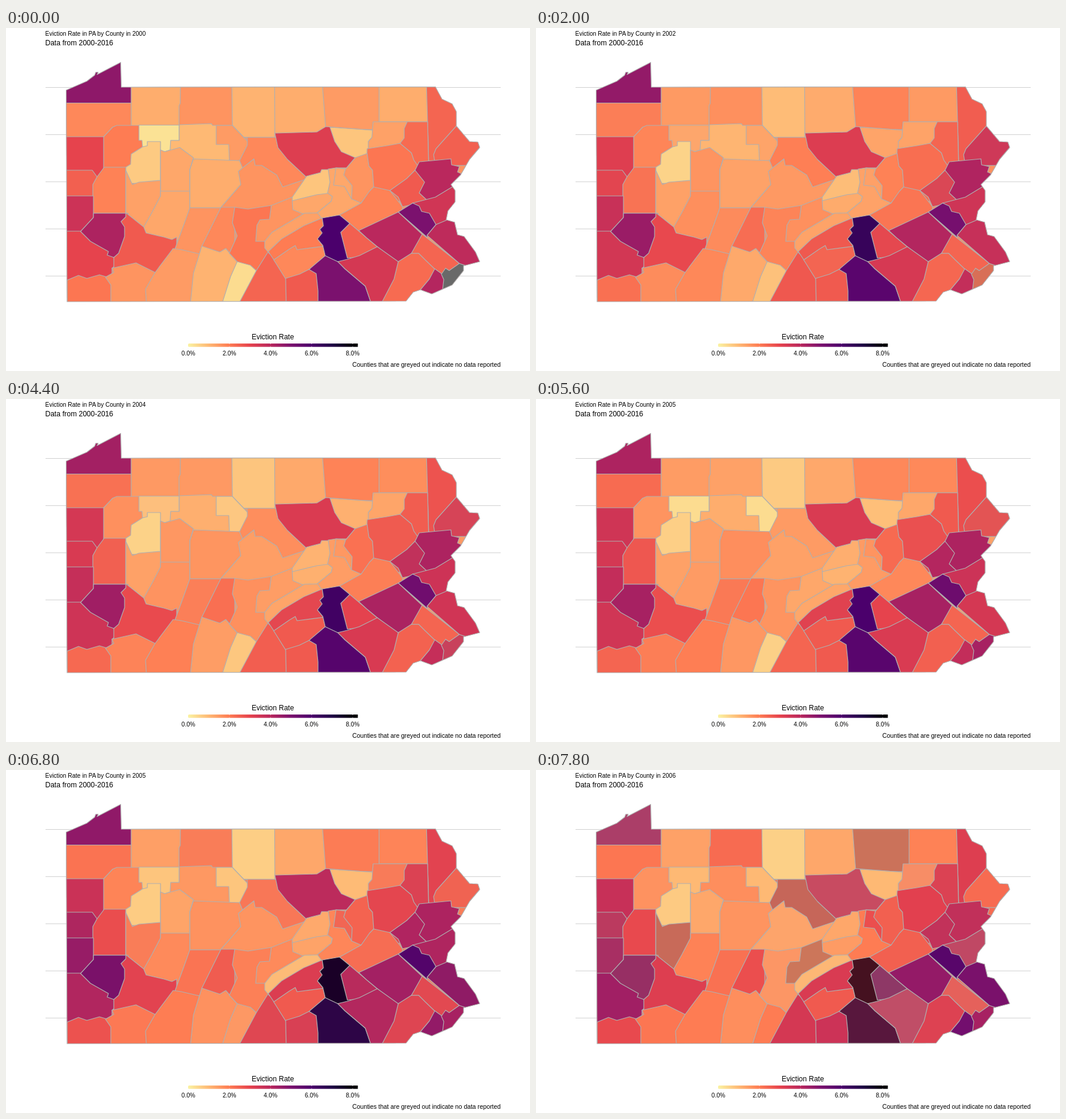
An HTML page for the animation above (8000 ms loop, 875x574 px).

```html
<!DOCTYPE html>
<html lang="en">
<head>
<meta charset="utf-8">
<title>Eviction Rate by County</title>
<style>
  html, body { margin: 0; width: 100%; height: 100%; overflow: hidden; background: #fff; }
  svg { display: block; width: 875px; height: 574px; }
  text { font: 10px "Liberation Sans", Arial, sans-serif; }
  .big { font-size: 12px; }
  .border { stroke: #afafaf; stroke-width: 1.2; stroke-linejoin: round; }
</style>
</head>
<body>
<svg viewBox="0 0 875 574">
  <defs>
    <linearGradient id="scale"></linearGradient>
    <clipPath id="inside"><path id="outline" d="M100.5 104L135 89 148 79 150 74H154L152 78 191.5 57.5 192.5 99 717 98.5 728 119 745 127 752 140V164L774 190 788 191 791 200 774 220 759 246 743 262 750 272V291L738 306 735 321 749 325 754 346 765 349 784 375 791 391 764 398V406L745 430 711 445 692 438 680 442 668 457 102 458z"/></clipPath>
  </defs>
  <g id="grid"></g>
  <g id="map" class="border" clip-path="url(#inside)"></g>
  <use href="#outline" class="border" fill="none"/>
  <text id="title" x="65.5" y="13"></text>
  <text class="big" x="65.5" y="29">Data from 2000-2016</text>
  <text class="big" x="445.5" y="521" text-anchor="middle">Eviction Rate</text>
  <rect x="304" y="528" width="283.5" height="5.6" fill="url(#scale)"/>
  <g id="ticks" text-anchor="middle"></g>
  <text x="826" y="567" text-anchor="end" style="font-size:10.35px">Counties that are greyed out indicate no data reported</text>
</svg>
<script>
const $ = id => document.getElementById(id);
const add = (parent, tag, attrs, text = "") => {
  const el = document.createElementNS("http://www.w3.org/2000/svg", tag);
  for (const key in attrs) el.setAttribute(key, attrs[key]);
  el.textContent = text;
  return parent.appendChild(el);
};

const parseHex = hex => [0, 2, 4].map(k => parseInt(hex.slice(k, k + 2), 16));
const mix = (a, b, k) => a.map((v, n) => v + (b[n] - v) * k);
const css = c => `rgb(${c.map(Math.round)})`;

// One colour per percent, starting at 0%
const palette = "faf3a3 feb974 fe7c53 e6434d ba285d 7b116e 4b006c 200646 020106 000000"
  .split(" ").map(parseHex);
const noData = parseHex("696969");

// Rates are tenths of a percent; x is missing data
function rateColour(rate) {
  if (rate === "x") return noData;
  const pos = rate / 10, n = Math.floor(pos);
  return mix(palette[n], palette[n + 1], pos - n);
}

const keySteps = [0, 13, 28, 37, 43];
const counties = [];

// Each county is painted over its predecessors, so only the new borders are exact.
// A dash leaves a key out; the colour then runs straight to the next one.
function county(d, rates) {
  const keys = rates.split(" ")
    .map((rate, n) => ({ step: keySteps[n], rate }))
    .filter(key => key.rate !== "-")
    .map(({ step, rate }) => ({ step, colour: rateColour(rate) }));
  keys.push({ ...keys[keys.length - 1], step: 99 });
  counties.push({ el: add($("map"), "path", { d }), keys });
}

// Northern tier
county("M0 0H900V600H0z", "47 46 42 49 16");
county("M0 125.5H400V600H0z", "18 - 23 21");
county("M209 0H900V600H209z", "12 16 - 14");
county("M292 0L291 126 289 130V600H900V0z", "16 17 14 23");
county("M376 0L378 163 397 183H900V0z", "11 9 - 6");
county("M448 0L449 183H900V0z", "12 - - 13");
county("M528 90L534 170H900V90z", "15 20 18 21 x");
county("M623 90V157H900V90z", "12 16 - 19");
county("M702 90L706 230H900V90z", "24 - 28 32");
county("M752 164L718 202 714 212 717 230H900V164z", "25 38 - 23");

// Northwest
county("M0 182H164V300H0z", "30 - - 37");
county("M163 182L178 166 185 163H290V300H163z", "20 18 16 20 9");
county("M289 162L343 160 345 163H375V240H258V188H289z", "10 - 12 17");
county("M222 162.5H289V188H275L274 204 265 207 228 199 227 188H222z", "3 16 4 10");
county("M351 163H378L420 207V222H373L372 195H351z", "15 13 4 10");
county("M236 190H258V260H200V233L208 228 209 211 228 199 236 197z", "7 5 - 7");
county("M258 204L265 207 290 200 313 217 307 237V280H258z", "13 17 - 13");

// Northeast
county("M397 183L403 184V196L390 222V300H502V183z", "18 20 15 24 x");
county("M449 176L519 174 534 165 612 171V250H502L470 220 454 200z", "32 - 33 42 15");
county("M541 166L612 171V217H583L560 207 549 190z", "8 15 9 10");
county("M613 157H670V205H605V190L611 183z", "14 - 13 24 4");
county("M670 157H704L706 240H658V193L665 184V168z", "23 - 26 35 26");
county("M603 202L636 197 658 193 677 209 681 221 690 234V290H600z", "21 23 - 31");
county("M690 224L743 219 744 229 757 232 754 241 775 250V300H690V250L683 238z", "40 42 - 42 29");

// West
county("M0 238H144L152 249V300H0z", "25 32 34 45 21");
county("M164 233H200V310H145V262L152 249z", "19 - - 29");
county("M0 281H146V341H0z", "36 - 38 49 24");
county("M200 238L211 262 222 258 258 255V340H200z", "14 - 14 23 x");
county("M258 273H307V356H230V333L244 308 258 281z", "13 18 15 19");
county("M124 341L146 317V310H204V390H124z", "42 46 43 55 20");
county("M0 340H124L141 357 171 374 169 380 180 384 183 397 177 402V422H0z", "30 36 35 44");
county("M102 422L121 414 135 419 156 413 180 420V470H102z", "21 - 24 29");
county("M200 309L230 333 234 343 264 350 277 354 285 350V420H180V384L188 377 198 349V333L192 324 200 316z", "26 30 28 32");
county("M166 417L180 409 177 402 217 393 249 409V470H175V430z", "16 - - 21");

// Centre
county("M307 237L313 219 390 222 395 234V301H307z", "12 - 17 16");
county("M395 234L414 219 416 230 427 230 452 246 462 266 498 254V310H359V300L392 262 388 240z", "16 - 14 17 6");
county("M307 301H360V378H279L296 332z", "16 - - 22");
county("M279 369L293 371 323 378V470H235L233 437 249 409z", "15 19 - 20");
county("M359 300H382V385H357L327 365z", "18 24 21 28");
county("M327 365L357 375 367 369 386 391V470H307L313 410z", "11 - - 17");
county("M382 300L404 303 443 297V390L418 406 386 391 373 377 386 348 378 326z", "21 18 16 21 5");
county("M386 391L408 397 418 406V470H358L375 416z", "4 10 6 20");
county("M443 297L478 283 500 310V340L432 357H417L419 330 424 321 440 320z", "16 17 13 20 x");
county("M438 374L470 380V470H384L418 406z", "24 27 24 34");
county("M502 248L525 242 527 237H545V289H478V283z", "8 - - 13");
county("M478 289L519 279 550 275V312H498L479 304z", "13 - 11 15");
county("M432 357L444 342 498 310 540 309V330L440 378 432 368z", "14 - 13 8 15");

// Susquehanna valley and anthracite region
county("M538 236L551 234H600V320H528L520 309 543 290 545 282 537 276 541 258z", "13 - 15 20");
county("M551 234L567 236 590 270 577 286 565 265 547 263z", "13 - 16 28");
county("M567 236L583 217 603 210 606 231 612 238 614 266 593 293 577 286 578 264 564 246z", "16 20 - 25");
county("M614 266L641 272 662 299V345H574L557 313 593 293 607 273z", "19 22 18 25");
county("M641 272L669 252 683 238 699 258 690 276 705 290 662 299 655 283z", "26 - 41 42 28");
county("M679 293L717 283 745 266H770V330H690z", "35 - 36 44 15");
county("M655 308L679 293 690 298 694 307 707 310 718 329 703 350z", "50 - 53 61 50");

// South
county("M438 374L460 353 497 331 528 318 540 375H480L450 392z", "20 28 - 33");
county("M447 388L473 370 483 364 486 371 540 364V400L506 420H467z", "18 26 - 26");
county("M467 419L490 412 506 404H530V470H468z", "26 - 26 36");
county("M506 404L533 381H546L566 403 600 432 613 470H521V440L518 411z", "50 59 57 73 33");
county("M528 318L557 313 574 327 590 385 554 391 533 381 529 364 520 353 528 343 524 337 530 331z", "60 66 60 83 36");
county("M574 327L620 366V380L570 385 559 342z", "25 31 30 44 x");
county("M589 339L655 308 700 350V395H655L602 351z", "40 - - 44 50");
county("M554 391L570 387 590 381 620 366 655 391V470H613L600 432 566 403z", "34 - 33 44 12");

// Southeast
county("M655 391L677 377H720V470H622L648 420z", "23 - 25 34 27");
county("M695 345L765 400 728 415 700 388 689 377H677z", "24 - 24 33 12");
county("M703 347L718 329 737 321H800V430L757 394z", "39 - 34 53 46");
county("M716 403L740 420V450H700L692 438 707 420z", "41 37 38 50 55");
county("M757 394L775 400V438H729L731 421 727 412 734 402 740 406z", "x 22 43 43");

palette.forEach((c, n) =>
  add($("scale"), "stop", { offset: Math.min(1, n / 8.25), "stop-color": css(c) }));
for (let n = 0; n < 5; n++) {
  const x = 304.5 + n * 68.6;
  add($("grid"), "path", { d: `M66 ${99.5 + n * 78.9}H826`, stroke: "#d0d0d0" });
  add($("ticks"), "path", { d: `M${x} 528v1.1m0 3.4v1.1`, stroke: "#fff", "stroke-width": 0.7 });
  add($("ticks"), "text", { x, y: 548 }, `${n * 2}.0%`);
}

const LOOP = 8000, STEP = 200;
let shown = -1;

function draw(step) {
  $("title").textContent = `Eviction Rate in PA by County in ${Math.round(2000 + step * 16 / 99)}`;
  for (const { el, keys } of counties) {
    const next = keys.findIndex(key => key.step > step);
    const a = keys[next - 1], b = keys[next];
    el.setAttribute("fill", css(mix(a.colour, b.colour, (step - a.step) / (b.step - a.step))));
  }
}

function tick() {
  const step = Math.floor(performance.now() % LOOP / STEP);
  if (step !== shown) draw(shown = step);
  requestAnimationFrame(tick);
}
tick();
</script>
</body>
</html>
```
